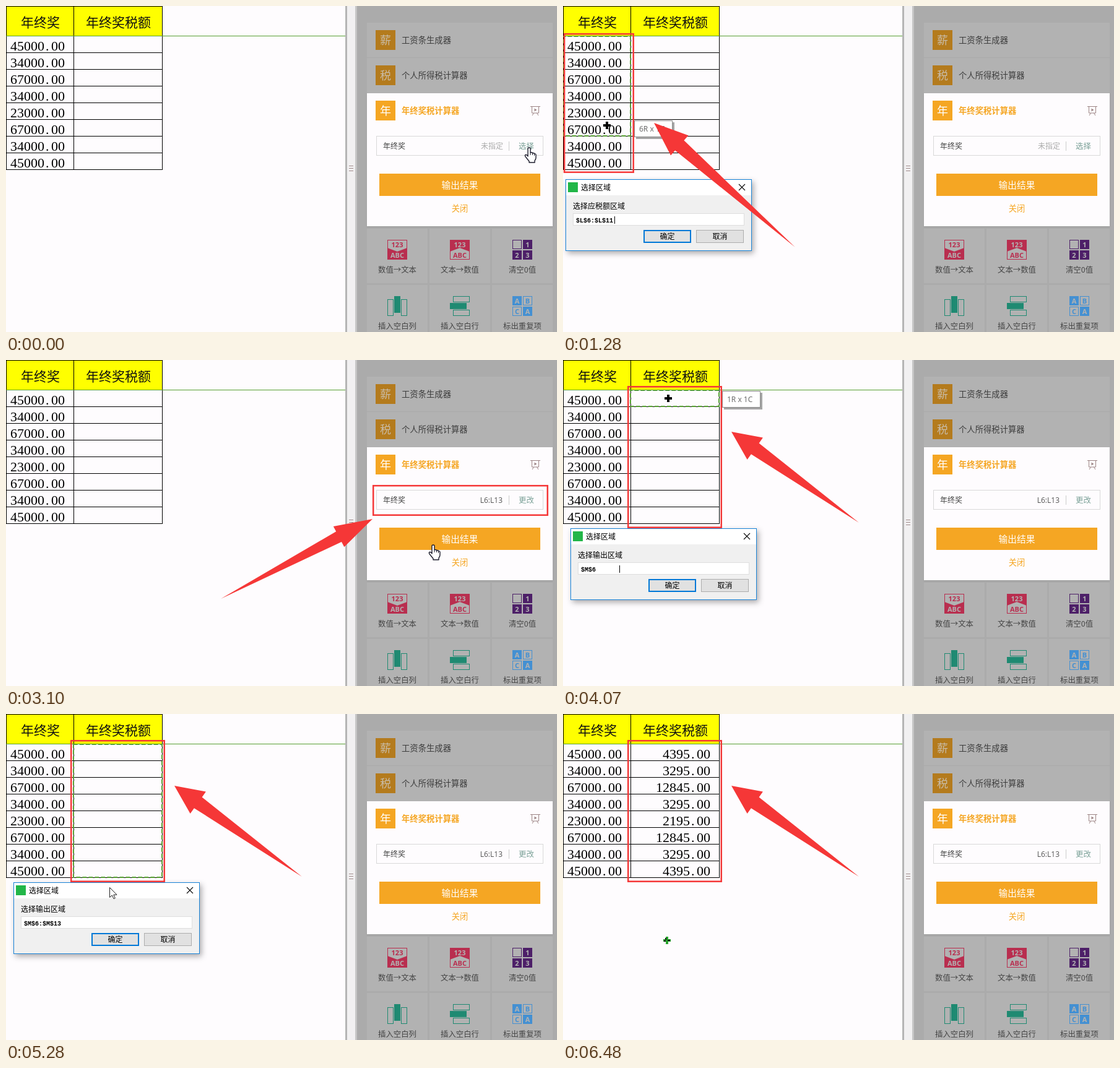
An HTML page for the animation above (6.98 s loop, 890x527 px).

```html
<!DOCTYPE html>
<html lang="zh-CN">
<head>
<meta charset="utf-8">
<title>年终奖税计算器</title>
<style>
  html, body { margin: 0; width: 100%; height: 100%; overflow: hidden; background: #fefcfe; }
  svg { display: block; width: 890px; height: 527px; }
  text { font-family: "Noto Sans CJK SC", "Noto Sans CJK", "Noto Sans", sans-serif; white-space: pre; }
  .head { font-weight: 300; }
  .num { font: 22px "Liberation Serif", serif; }
  .mono { font: bold 10px "Liberation Mono", monospace; }
  .latin { font-family: "Open Sans", "Noto Sans", sans-serif; }
  .bold { font-weight: bold; }
  .mid { text-anchor: middle; }
  .end { text-anchor: end; }
  .crisp { shape-rendering: crispEdges; }
  .shadow { filter: drop-shadow(3px 4px 5px rgba(0, 0, 0, .32)); }
  .tipShadow { filter: drop-shadow(3px 3px 0 #a5a5a5); }
  .mark { fill: none; stroke: #f53737; stroke-width: 2.5; }
</style>
</head>
<body>
<svg id="stage" viewBox="0 0 890 527"></svg>
<script>
const LOOP = 6980, STEP = 70;
const ROW = 27, TOP = 49;
const bonus = [45000, 34000, 67000, 34000, 23000, 67000, 34000, 45000];
const taxes = { 45000: 4395, 34000: 3295, 67000: 12845, 23000: 2195 };

// ---- drawing helpers ----
const box = (x, y, w, h, fill, more = '') =>
  `<rect class="crisp" x="${x}" y="${y}" width="${w}" height="${h}" fill="${fill}" ${more}/>`;
const frame = (x, y, w, h, color, fill = 'none') =>
  `<rect class="crisp" x="${x + .5}" y="${y + .5}" width="${w - 1}" height="${h - 1}" fill="${fill}" stroke="${color}"/>`;
const path = (d, more = '') => `<path d="${d}" ${more}/>`;
const group = (id, body, more = '') => `<g id="${id}" ${more}>${body}</g>`;
// y is the vertical centre of the glyphs
const text = (x, y, s, size, fill, cls = '', id = '') =>
  `<text x="${x}" y="${y + size * .38}" font-size="${size}" fill="${fill}" class="${cls}"${id && ` id="${id}"`}>${s}</text>`;
const mark = (x, y, w, h) => `<rect class="mark" x="${x}" y="${y}" width="${w}" height="${h}"/>`;

function arrow(tipX, tipY, tailX, tailY, head, half) {
  const len = Math.hypot(tailX - tipX, tailY - tipY);
  const ux = (tailX - tipX) / len, uy = (tailY - tipY) / len;
  const at = (a, p) => `${(tipX + ux * a - uy * p).toFixed(1)},${(tipY + uy * a + ux * p).toFixed(1)}`;
  const pts = [at(0, 0), at(head, -half), at(head, -half / 2), at(len, 0), at(head, half / 2), at(head, half)];
  return `<polygon points="${pts.join(' ')}" fill="#f53737"/>`;
}

function money(value, right, base) {
  return `<text class="num end" x="${right}" y="${base}">${value}</text>` +
    `<text class="num" x="${right + 2}" y="${base}">.</text>` +
    `<text class="num" x="${right + 11}" y="${base}">00</text>`;
}

// ---- parts ----
function sheet() {
  let s = box(0, 0, 252, 48, '#ffff00');
  for (const x of [0, 109, 252]) s += box(x, 0, 1, 265, '#000');
  s += box(0, 0, 253, 1, '#000');
  bonus.forEach((v, i) => {
    s += box(0, TOP + ROW * (i + 1) - 1, 253, 1, '#000');
    s += money(v, 62, 72 + ROW * i);
    s += group('tax' + i, money(taxes[v], 205, 72 + ROW * i));
  });
  return s + box(0, 48, 548, 1, '#57a032') +
    text(55.5, 26, '年终奖', 21, '#111', 'head mid') +
    text(181.5, 26, '年终奖税额', 21, '#111', 'head mid');
}

function divider() {
  let s = box(548, 0, 3, 527, '#b5b5b5') + box(551, 0, 13, 527, '#f1f0f1') + box(564, 0, 3, 527, '#c6c6c6');
  for (const y of [258, 262, 266]) s += box(554, y, 7, 1, '#a08c8c');
  return s;
}

function abcIcon(x, up) {
  const red = '#b92e4f', pale = '#b2b2b2';
  const fill = up ? `M${x} 378h32v19l-16-6l-16 6z` : `M${x} 391l16 6l16-6v19h-32z`;
  return frame(x, 378, 32, 32, red) + path(fill, `fill="${red}"`) +
    text(x + 16, 385.5, '123', 11, up ? pale : red, 'latin bold mid') +
    text(x + 16, 402.5, 'ABC', 11, up ? red : pale, 'latin bold mid');
}

function fourIcon(y, color, letters, filled) {
  return [...letters].map((c, i) => {
    const x = 818 + 17 * (i % 2), cy = y + 17 * (i >> 1), on = filled[i] === '1';
    return frame(x, cy, 15, 15, color, on ? color : 'none') +
      text(x + 7.5, cy + 7.5, c, 11, on ? '#b2b2b2' : color, 'latin bold mid');
  }).join('');
}

function panel() {
  const orange = '#f5a623', dim = '#b47b1d', teal = '#1f8a72', ink = '#3d3d3d';
  const badge = (y, c, fill, color) => box(597, y, 32, 32, fill) + text(613, y + 16, c, 18, color, 'mid');
  let s = box(567, 0, 323, 527, '#ababab') + box(583, 27, 300, 114, '#b2b2b2') + box(583, 83, 300, 1, '#aaa');
  s += badge(39, '薪', dim, '#c9bca8') + text(639, 55, '工资条生成器', 13.33, ink);
  s += badge(96, '税', dim, '#c9bca8') + text(639, 112, '个人所得税计算器', 13.33, ink);

  const labels = ['数值→文本', '文本→数值', '清空0值', '插入空白列', '插入空白行', '标出重复项'];
  labels.forEach((l, i) => {
    const x = 583 + 101 * (i % 3), y = i < 3 ? 360 : 451;
    s += box(x, y, 98, 88, '#b2b2b2') + text(x + 49, y + 66.5, l, 12.4, '#454545', 'mid');
  });
  s += abcIcon(616, false) + abcIcon(717, true);
  s += fourIcon(378, '#4d1f68', ' 123', '0111') + fourIcon(469, '#4490d2', 'ABCA', '1001');
  s += frame(616, 474, 10, 27, teal) + box(627, 469, 10, 27, teal) + frame(638, 474, 10, 27, teal);
  s += frame(722, 469, 27, 10, teal) + box(717, 480, 27, 10, teal) + frame(722, 491, 27, 10, teal);

  s += box(583, 141, 300, 215, '#fefcfe', 'style="filter:drop-shadow(0 1px 1px #999)"');
  s += badge(153, '年', orange, '#fff') + text(639, 169, '年终奖税计算器', 13.33, orange, 'bold');
  s += path('M847 162.5h16M849.5 162.5v10.5h11v-10.5M852.5 173l-2.5 4M857.5 173l2.5 4', 'fill="none" stroke="#9d8585"');
  s += path('M853.5 165.5v5l4-2.5z', 'fill="#9d8585"');
  s += frame(598, 210, 270, 32, '#d9d9d9') + box(812, 219, 1, 15, '#ccc');
  s += text(609, 226, '年终奖', 12, '#444');
  s += group('unset', text(803, 226, '未指定', 12, '#aaa', 'end') + text(828, 226, '选择', 12.4, '#7aa097'));
  s += group('set', text(802, 226, 'L6:L13', 12, '#555', 'latin end') + text(828, 226, '更改', 12.4, '#7aa097'));
  s += box(603, 271, 260, 36, orange) + text(733, 289, '输出结果', 14.7, '#fff', 'mid');
  return s + text(733, 327, '关闭', 13.33, orange, 'mid');
}

function dialog() {
  return group('dialog',
    frame(0, 0, 301, 116, '#1883d7', '#f0f0f0') + box(1, 1, 299, 25, '#fff') +
    box(4, 5, 16, 16, '#22b648') + text(25, 13, '选择区域', 12, '#000') +
    path('M280 8l10 10M290 8l-10 10', 'stroke="#111" stroke-width="1.2"') +
    text(12, 43, '', 12, '#000', '', 'label') +
    frame(12, 55, 277, 20, '#dedede', '#fff') +
    '<text id="range" class="mono" x="17" y="70"></text>' + group('caret', box(79, 60, 1, 12, '#000')) +
    group('ok', box(126, 82, 77, 21, '#0078d7') + box(128, 84, 73, 17, '#e1e1e1')) +
    group('okHot', frame(126, 82, 77, 21, '#005499', '#cce4f7')) +
    frame(211, 82, 77, 21, '#adadad', '#e1e1e1') +
    text(164.5, 92.5, '确定', 12, '#000', 'mid') + text(249.5, 92.5, '取消', 12, '#000', 'mid'),
    'class="shadow"');
}

function cursors() {
  const hand = 'M-2 1.5Q-2 0 0 0T2 1.5V8Q5 7 5.5 9Q8 8 8.5 10Q11 9.5 11 12V16Q11 19 9 21V24H0V22' +
    'L-6 14.5Q-7.5 12 -5.5 11.5T-2 14Z';
  return group('cursor',
    group('hand', path(hand, 'fill="#fff" stroke="#1c1c2c" stroke-width="1.4" stroke-linejoin="round"') +
      path('M2 8v4M5.5 9v3M8.5 10v3', 'stroke="#1c1c2c"')) +
    group('pointer', path('M.5 .5V16.5L4.3 13L7 18.7L9.3 17.7L6.8 12.2H12Z', 'fill="#fff" stroke="#222"')) +
    group('plus', box(-2, -6, 4, 12, '#000') + box(-6, -2, 12, 4, '#000')) +
    group('greenPlus', box(-2, -6, 4, 12, '#27a52c') + box(-6, -2, 12, 4, '#27a52c') +
      path('M-3 -4h2v3h-2zM1 -1h4v2h-4zM-5 0h3v2h-3z', 'fill="#111"')));
}

document.getElementById('stage').innerHTML =
  box(0, 0, 890, 527, '#fefcfe') + sheet() + divider() + panel() +
  '<rect id="ants" fill="none" stroke="#57a032" stroke-width="2" stroke-dasharray="7 3"/>' +
  dialog() +
  group('tip', frame(0, 0, 62, 27, '#8a8a8a', '#fff') + text(8, 13.5, '', 12, '#666', 'latin', 'tipText'), 'class="tipShadow"') +
  group('noteSelect', mark(816, 208, 53, 36) + arrow(815, 248, 567, 358, 61, 19)) +
  group('noteBonus', mark(2.2, 45.2, 111.5, 223.5) + arrow(147, 189, 375, 390, 55, 21.5)) +
  group('noteInput', mark(593.2, 203.2, 281.5, 47.5) + arrow(592, 257, 347, 386, 61.5, 18.8)) +
  group('noteTax', mark(105.2, 43.2, 150.5, 227.5) + arrow(272, 116, 478, 263, 47, 21.8)) +
  cursors();

const el = {};
document.querySelectorAll('[id]').forEach(n => el[n.id] = n);
const show = (id, on) => { el[id].style.display = on ? '' : 'none'; };
const place = (id, x, y) => el[id].setAttribute('transform', `translate(${x} ${y})`);

// ---- timeline ----
// spans during which the picture advances; it rests between them
const spans = [[0, 0], [30, 30], [930, 1630], [1830, 1830], [1930, 2490], [2620, 2690], [2820, 3100],
  [4070, 4770], [5070, 5070], [5100, 5730], [5860, 5930], [6060, 6480]];
const route = [[0, 845, 229], [930, 845, 229], [930, 60, 62], [1280, 71, 193], [1630, 68, 250], [1830, 68, 250],
  [2210, 101, 287], [2490, 168, 380], [2820, 168, 380], [3100, 690, 299], [4070, 690, 299], [4070, 170, 62],
  [4560, 167, 201], [4770, 167, 250], [5070, 167, 250], [5730, 168, 366], [LOOP, 168, 366]];
const picks = [
  { from: 930, drop: 1830, clear: 2690, close: 2820, x: 4, y: 280, left: 1, right: 109, tipX: 115, lag: 0, col: 'L', label: '选择应税额区域' },
  { from: 4070, drop: 5070, clear: 5930, close: 6060, x: 12, y: 272, left: 109, right: 252, tipX: 257, lag: STEP, col: 'M', label: '选择输出区域' },
];

function snap(t) {
  const [a, b] = spans.findLast(s => s[0] <= t);
  return Math.min(a + Math.floor((t - a) / STEP) * STEP, b);
}

function cursorAt(t) {
  const i = route.findLastIndex(k => k[0] <= t);
  const [t0, x0, y0] = route[i], [t1, x1, y1] = route[i + 1];
  const k = (t - t0) / (t1 - t0);
  return [Math.round(x0 + (x1 - x0) * k), Math.round(y0 + (y1 - y0) * k)];
}

const rowsAt = y => Math.max(1, Math.min(8, Math.floor((y - TOP) / ROW) + 1));

function drawPick(p, t, x, y) {
  const dragging = t < p.drop, rows = dragging ? rowsAt(y) : 8;
  place('dialog', p.x, p.y);
  el.label.textContent = p.label;
  el.range.textContent = `$${p.col}$6` + (rows > 1 ? `:$${p.col}$${5 + rows}` : '');
  const dx = x - p.x, dy = y - p.y;
  const hot = dx >= 126 && dx < 203 && dy >= 82 && dy < 103;
  show('caret', dragging);
  show('ok', !hot);
  show('okHot', hot);

  const box = { x: p.left, y: TOP, width: p.right - p.left, height: rows * ROW - 1, 'stroke-dashoffset': -t / STEP * 2 };
  for (const k in box) el.ants.setAttribute(k, box[k]);

  const shown = rowsAt(cursorAt(Math.max(p.from, t - p.lag))[1]);
  place('tip', p.tipX, TOP + ROW * (rows - 1) + 1);
  el.tipText.textContent = `${t >= p.drop - 300 ? rows : shown}R x 1C`;
  return dy >= 0 && dx >= 0 && dx < 301;
}

function render(now) {
  const t = snap(now % LOOP);
  const [x, y] = cursorAt(t);
  const pick = picks.find(p => t >= p.from && t < p.close);
  const overDialog = pick && drawPick(pick, t, x, y);
  show('dialog', pick);
  show('ants', pick && t < pick.clear);
  show('tip', pick && t < pick.drop);

  const done = t >= 2820;
  show('unset', !done);
  show('set', done);
  show('noteSelect', t >= 30 && t < 930);
  show('noteBonus', t >= 930 && t < 2820);
  show('noteInput', t >= 3100 && t < 4070);
  show('noteTax', t >= 4070);

  const filled = Math.round((t - 6060) / 420 * 8);
  bonus.forEach((_, i) => show('tax' + i, i < filled));

  const kind = x >= 603 ? 'hand' : x > 548 || overDialog ? 'pointer' : t >= 6060 ? 'greenPlus' : 'plus';
  for (const id of ['hand', 'pointer', 'plus', 'greenPlus']) show(id, id === kind);
  place('cursor', x, y);
}

const start = performance.now();
function tick() {
  render(performance.now() - start);
  requestAnimationFrame(tick);
}
tick();
</script>
</body>
</html>
```
